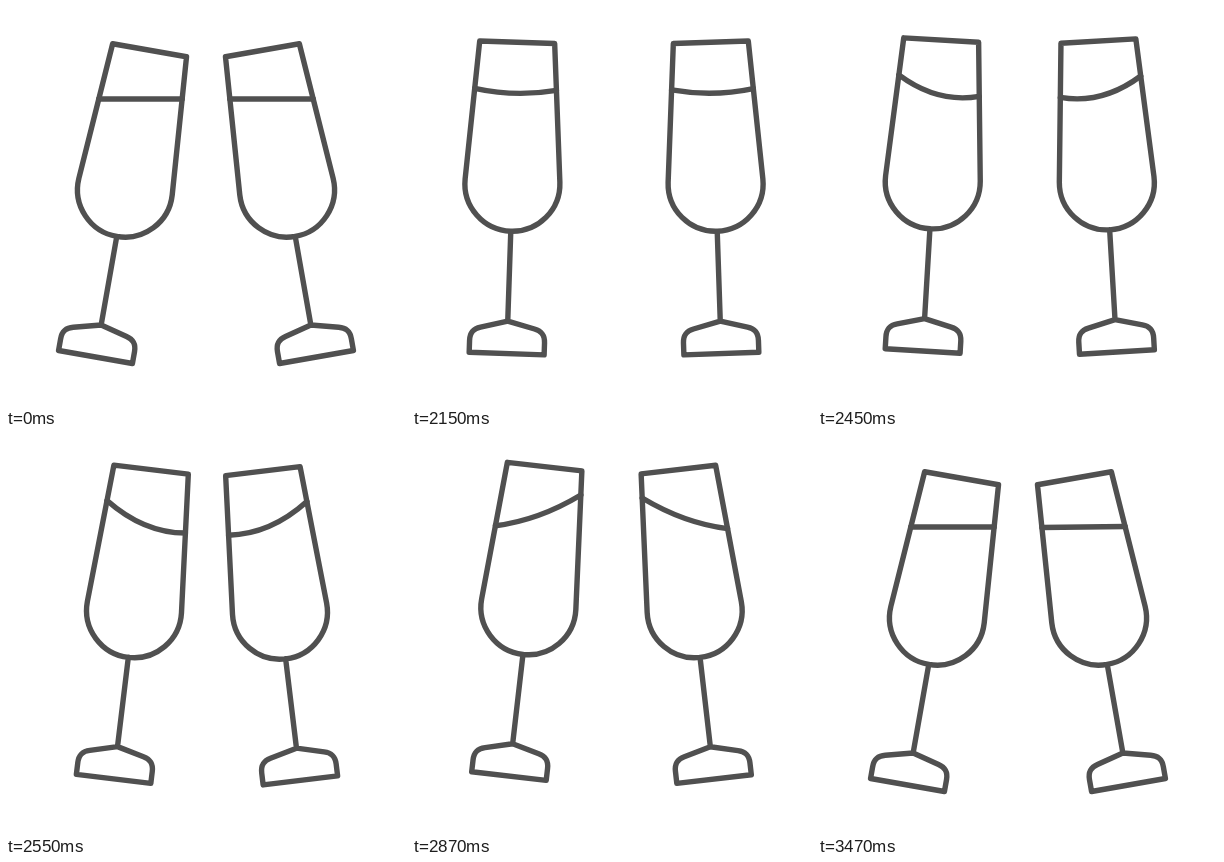
Write an HTML page that moves like this. It is 400 by 400 pixels and loops after 3520 ms.

```html
<!DOCTYPE html>
<html lang="en">
<head>
<meta charset="utf-8">
<title>Toast</title>
<style>
html, body { margin: 0; height: 100%; overflow: hidden; background: #fff; }
svg { display: block; width: 100vw; height: 100vh; fill: none; stroke: #505050; stroke-width: 5.4; stroke-linecap: round; stroke-linejoin: round; }
</style>
</head>
<body>
<svg viewBox="0 0 400 400">
  <defs>
    <path id="glass" d="M-47.4-173L-37.5-311.5H37.5L47.4-173A47.5 47.5 0 1 1-47.4-173M0-122.5V-32.5M-37.5 0H37.5V-12C37.5-21 33-24 27-25.5L0-32.5L-27-25.5C-33-24-37.5-21-37.5-12Z"/>
  </defs>
  <g class="glass"><use href="#glass"/><path/></g>
  <g transform="translate(400 0) scale(-1 1)"><g class="glass"><use href="#glass"/><path/></g></g>
</svg>
<script>
const LOOP = 3520, START = 2020, PEAK = 2550, SETTLED = 3470;

const linear = p => p;
const inOut = p => (1 - Math.cos(Math.PI * p)) / 2;
const out = p => 1 - (1 - p) ** 2;
const ramp = (t, from, to) => Math.min(1, Math.max(0, (t - from) / (to - from)));

// at: time; left: foot x, foot y, lean; shift: how far the mirrored glass departs from that
const rest = { left: [89.5, 351, 10], shift: [0, 0, 0] };
const poses = [
  { at: 1984, ...rest },
  { at: 2290, left: [98.5, 345, -4.1], shift: [-7, 0, 0], ease: inOut },
  { at: PEAK, left: [107.5, 345, 6.9], shift: [-2, 1.5, 0], ease: inOut },
  { at: 2620, left: [114, 337.5, 8], shift: [0, 2.5, 0], ease: linear },
  { at: 2870, left: [97, 342, 6.55], shift: [1, 3, 0], ease: linear },
  { at: 3110, ...rest, ease: out }
];

function pose(t, right) {
  const place = k => k.left.map((v, c) => v + right * k.shift[c]);
  const i = poses.findIndex(k => k.at > t);
  if (t < START || i < 0) return rest.left;
  const a = poses[i - 1], b = poses[i];
  const from = place(a), to = place(b), e = b.ease(ramp(t, a.at, b.at));
  return from.map((v, c) => v + (to[c] - v) * e);
}

// The liquid climbs one wall during the swing, then rocks and calms down
function tiltAt(t, size) {
  if (t < PEAK) return size * ramp(t, START, PEAK) ** 2;
  return size * (1 - ramp(t, PEAK, SETTLED) ** 3) * Math.cos(2 * Math.PI * (t - PEAK) / 740);
}

function liquid(t, lean, right) {
  const sag = 10 * Math.min(ramp(t, START, 2350), 1 - ramp(t, 2350, SETTLED));
  const tilt = right ? tiltAt(t - 30, 26) : tiltAt(t, 22.6);
  const level = -262 - 0.65 * sag + 0.13 * tilt;
  const slope = Math.tan((tilt - lean) * Math.PI / 180), flare = 0.0715;
  const half = 37.5 + (level + 311.5) * flare;
  const end = side => {
    const x = side * half / (1 - side * slope * flare);
    return `${x} ${level + slope * x}`;
  };
  return `M${end(-1)}Q0 ${level + 2 * sag} ${end(1)}`;
}

const glasses = document.querySelectorAll('.glass');
const begin = performance.now();

function frame() {
  const t = (performance.now() - begin) % LOOP;
  glasses.forEach((g, right) => {
    const [x, y, lean] = pose(t, right);
    g.setAttribute('transform', `translate(${x} ${y}) rotate(${lean})`);
    g.lastElementChild.setAttribute('d', liquid(Math.min(t, SETTLED + 30), lean, right));
  });
  requestAnimationFrame(frame);
}
frame();
</script>
</body>
</html>
```
